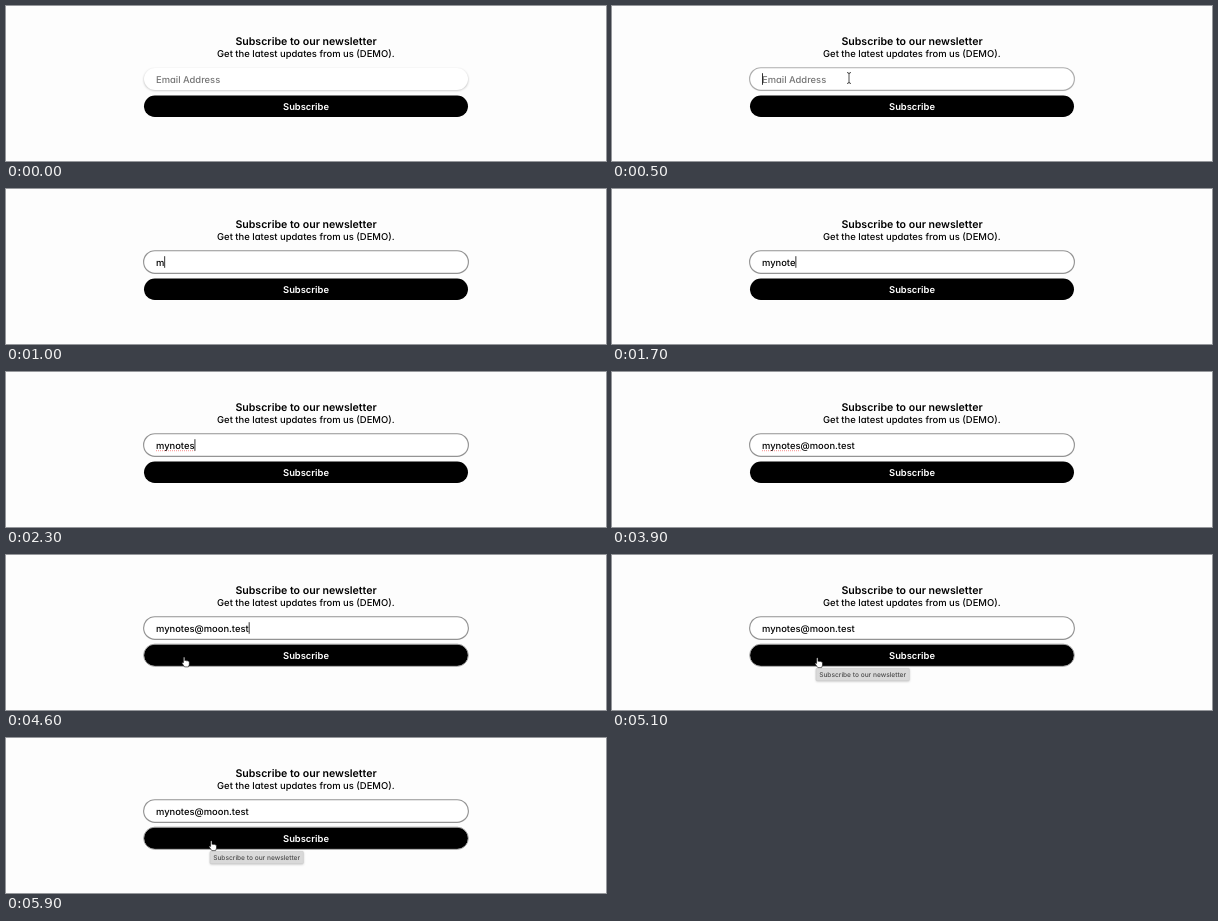
Animation of 600 by 155 pixels, one loop 6000 ms. Source, as an HTML page:

```html
<!DOCTYPE html>
<html lang="en">
<head>
<meta charset="utf-8">
<title>Newsletter form</title>
<style>
  html, body { margin: 0; width: 100%; height: 100%; overflow: hidden; background: #fdfdfd; }
  svg { display: block; width: 600px; height: 155px; }
  text { font: 450 9.4px Inter, "Open Sans", sans-serif; font-feature-settings: "cv11"; white-space: pre; text-rendering: geometricPrecision; }
  .middle { text-anchor: middle; }
  .title { font-size: 10.6px; font-weight: 600; }
  .subtitle { font-size: 9.45px; }
  .button { font-weight: 600; fill: #fff; }
  .tip { font-size: 6.6px; fill: #4c4c4c; font-feature-settings: normal; }
</style>
</head>
<body>
<svg viewBox="0 0 600 155">
  <defs>
    <filter id="soft" x="-5%" y="-40%" width="110%" height="200%">
      <feGaussianBlur stdDeviation="1.3"/>
    </filter>
  </defs>
  <rect width="600" height="155" fill="#fdfdfd"/>
  <text class="middle title" x="300" y="39">Subscribe to our newsletter</text>
  <text class="middle subtitle" x="299.8" y="51.3">Get the latest updates from us (DEMO).</text>

  <rect id="shadow" x="138" y="63" width="324" height="21.5" rx="10.7" fill-opacity=".27" filter="url(#soft)"/>
  <rect x="138" y="62" width="324" height="22" rx="11" fill="#fff"/>
  <rect id="focusRing" x="137.6" y="61.7" width="324.8" height="22.6" rx="11.3" fill="none" stroke="#949494" stroke-width="1.15"/>
  <text id="placeholder" x="150" y="76.6" fill="#757575">Email Address</text>
  <path id="squiggle" fill="none" stroke="#f0524f" stroke-opacity=".8" stroke-width=".8" stroke-dasharray="1 1"/>
  <text id="typed" x="150" y="76.6"></text>
  <rect id="caret" y="67.2" width=".8" height="11.6"/>
  <path id="beam" d="M-2 -5.5Q0 -5.5 0 -4Q0 -5.5 2 -5.5M0 -4V4M-2 5.5Q0 5.5 0 4Q0 5.5 2 5.5" transform="translate(237 72)" fill="none" stroke="#222" stroke-width=".8"/>

  <rect x="138" y="89.5" width="324" height="21.5" rx="10.75"/>
  <rect id="hoverRing" x="137.7" y="89.2" width="324.6" height="22.1" rx="11" fill="none" stroke="#949494" stroke-width=".9"/>
  <text class="middle button" x="300" y="103.9">Subscribe</text>

  <g id="tooltip">
    <rect x="204" y="114" width="93.5" height="12.5" rx="1" fill-opacity=".22" filter="url(#soft)"/>
    <rect x="204" y="113.3" width="93.3" height="12.4" rx=".8" fill="#d9d9d9" stroke="#c6c6c6" stroke-width=".5"/>
    <text class="middle tip" x="250.6" y="121.8">Subscribe to our newsletter</text>
  </g>
  <g id="pointer" stroke="#111" stroke-width=".6" stroke-linejoin="round" fill="#fff">
    <path id="arrow" d="M0 0V9L2.1 7.1L3.5 10.2L4.9 9.6L3.6 6.6H6.3Z" fill="#111" stroke="#fff"/>
    <path id="hand" d="M1.6 .8Q2.3 -.3 3 .8V4Q4 3.2 4.6 4.1Q5.5 3.5 6 4.4Q7.3 4.1 7.5 5.4V7.8L6.6 10.2H2.8L.1 6.4Q-.1 5.2 1.6 6Z"/>
  </g>
</svg>
<script>
const LOOP = 6000, STEP = 100, TEXT_X = 150;
const EMAIL = "mynotes@moon.test", USER_LENGTH = 7;
// [time, number of typed characters]
const KEYS = [[900, 1], [1100, 2], [1300, 3], [1400, 4], [1500, 5], [1700, 6], [1900, 7],
  [2500, 8], [2700, 9], [2800, 10], [2900, 12], [3100, 13], [3300, 14], [3600, 16], [3700, 17]];
// [time, x, y]
const PATH = [[4100, 117, 102], [4500, 175.8, 101.7], [4700, 175.8, 101.7], [4900, 203, 102.4]];

const $ = id => document.getElementById(id);
const show = (id, on) => $(id).setAttribute("visibility", on ? "visible" : "hidden");
const fade = (id, value) => $(id).setAttribute("opacity", value);
const ramp = (t, from, to) => Math.min(1, Math.max(0, (t - from) / (to - from)));
const between = (t, from, to) => t >= from && t < to;

function pointerAt(t) {
  let [, x, y] = PATH[0];
  for (let i = 1; i < PATH.length; i++) {
    const p = ramp(t, PATH[i - 1][0], PATH[i][0]);
    const ease = p * p * (3 - 2 * p);
    x += (PATH[i][1] - PATH[i - 1][1]) * ease;
    y += (PATH[i][2] - PATH[i - 1][2]) * ease;
  }
  return [x, y];
}

function caretOn(t) {
  if (t >= 3900) return Math.floor((t - 3900) / 200) % 2 === 1;
  return t >= 500 && !between(t, 2100, 2300);
}

function setTyped(count) {
  const typed = $("typed");
  typed.textContent = EMAIL.slice(0, count);
  return count ? typed.getComputedTextLength() : 0;
}

function render(time) {
  const t = Math.floor(time % LOOP / STEP) * STEP;
  const focus = ramp(t, 200, 600);
  const count = KEYS.reduce((n, [at, length]) => t >= at ? length : n, 0);

  fade("focusRing", focus);
  fade("shadow", 1 - focus);
  fade("hoverRing", ramp(t, 4200, 4600));
  show("placeholder", count === 0);
  show("beam", between(t, 300, 800));

  $("squiggle").setAttribute("d", `M${TEXT_X} 78.7h${setTyped(USER_LENGTH)}`);
  $("caret").setAttribute("x", TEXT_X + setTyped(count));
  show("caret", caretOn(t));
  show("squiggle", between(t, 2300, 4100));

  const [x, y] = pointerAt(t);
  const onButton = x > 140;
  $("pointer").setAttribute("transform", `translate(${x} ${y})`);
  show("arrow", t >= 4100 && !onButton);
  show("hand", t >= 4100 && onButton);
  show("tooltip", t >= 5100);
}

const start = performance.now();
function tick() {
  render(performance.now() - start);
  requestAnimationFrame(tick);
}
tick();
</script>
</body>
</html>
```
